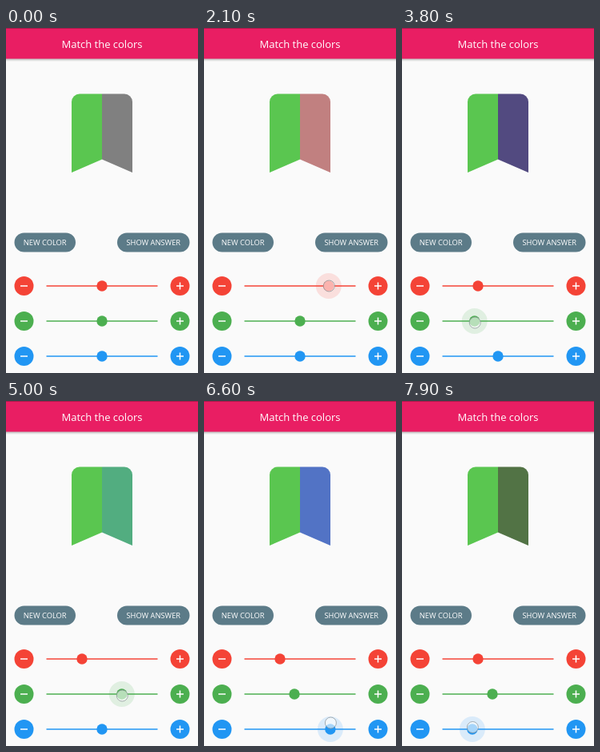
These frames come from a looping animation (240x432 px, 8000 ms). An HTML page:

```html
<!DOCTYPE html>
<html lang="en">
<head>
<meta charset="utf-8">
<title>Match the colors</title>
<style>
  html, body { margin: 0; height: 100%; overflow: hidden; background: #fafafa; }
  svg { display: block; width: 100vw; height: 100vh; }
  text { fill: #fff; font: 500 9.3px "Open Sans", "Noto Sans", sans-serif; text-anchor: middle; }
  .title { font-size: 13px; }
  .pill { fill: #5c7b88; }
  .icon { stroke: #fff; stroke-width: 1.5; }
</style>
</head>
<body>
<svg viewBox="0 0 240 432">
  <defs>
    <linearGradient id="shade" x2="0" y2="1">
      <stop stop-opacity=".28"/>
      <stop offset="1" stop-opacity="0"/>
    </linearGradient>
  </defs>
  <rect y="38" width="240" height="4" fill="url(#shade)"/>
  <rect width="240" height="38.5" fill="#e91e63"/>
  <rect width="240" height="1" fill="#b0184c"/>
  <text class="title" x="120" y="24.5">Match the colors</text>

  <path fill="#5ac650" d="M120 82.5H92a10 10 0 0 0-10 10V181l38-16.5z"/>
  <path id="guess" d="M120 82.5h28a10 10 0 0 1 10 10V181l-38-16.5z"/>

  <rect class="pill" x="10.5" y="256.5" width="76.5" height="24" rx="12"/>
  <text x="48.7" y="271.8">NEW COLOR</text>
  <rect class="pill" x="139" y="256.5" width="90.5" height="24" rx="12"/>
  <text x="184.3" y="271.8">SHOW ANSWER</text>

  <g id="sliders"></g>
  <circle id="touch" r="7" fill="#fff" fill-opacity=".6" stroke="#8c9499" stroke-opacity=".75"/>
</svg>
<script>
const LOOP = 8000, LEFT = 50.5, WIDTH = 139;
const $ = id => document.getElementById(id);
const smooth = p => p * p * (3 - 2 * p);
const accelerate = p => p * p;

// Keys are [time, thumb x, easing towards this key]; lift is the finger's offset from the thumb.
const sliders = [
  { y: 323, color: '#f44336', press: [900, 2700], lift: [[0, 0]],
    keys: [[900, 120], [1700, 171], [1900, 171], [2600, 95]] },
  { y: 367, color: '#4caf50', press: [3200, 5600], lift: [[3200, 0], [3800, 2]],
    keys: [[3200, 120], [3900, 89], [4300, 89], [5150, 171, accelerate], [5500, 113]] },
  { y: 411, color: '#2196f3', press: [6200, LOOP], lift: [[6200, 0], [6600, -8], [7000, -8], [7900, -2.5]],
    keys: [[6200, 120], [6800, 171], [7000, 171], [8100, 80]] }
];

function sample(keys, t) {
  const next = keys.findIndex(key => key[0] > t);
  if (next === 0) return keys[0][1];
  if (next < 0) return keys[keys.length - 1][1];
  const [t0, x0] = keys[next - 1], [t1, x1, ease = smooth] = keys[next];
  return x0 + (x1 - x0) * ease((t - t0) / (t1 - t0));
}

$('sliders').innerHTML = sliders.map(({ y, color }) => `
  <g transform="translate(0 ${y})" fill="${color}">
    <circle cx="22.5" r="12"/><path class="icon" d="M18 0h9"/>
    <circle cx="217.5" r="12"/><path class="icon" d="M213 0h9M217.5-4.5v9"/>
    <path d="M${LEFT} 0h${WIDTH}" stroke="${color}" stroke-width="1.6"/>
    <circle class="halo" fill-opacity=".15"/>
    <circle class="thumb" r="6.7"/>
  </g>`).join('');

const halos = document.querySelectorAll('.halo');
const thumbs = document.querySelectorAll('.thumb');

function draw(now) {
  const t = now % LOOP;
  let touching = false;
  const channels = sliders.map(({ y, keys, press: [down, up], lift }, i) => {
    const x = sample(keys, t);
    const pressed = t >= down && t < up;
    thumbs[i].setAttribute('cx', x);
    halos[i].setAttribute('cx', x);
    halos[i].setAttribute('r', pressed ? 16 * Math.min(1, .5 + (t - down) / 200) : 0);
    if (pressed) {
      touching = true;
      $('touch').setAttribute('cx', x + .5);
      $('touch').setAttribute('cy', y + sample(lift, t));
    }
    return Math.round((x - LEFT) / WIDTH * 255);
  });
  $('touch').setAttribute('visibility', touching ? 'visible' : 'hidden');
  $('guess').setAttribute('fill', `rgb(${channels})`);
  requestAnimationFrame(draw);
}
const start = performance.now();
(function tick() { draw(0); })();
draw = (frame => frame)(draw);
</script>
</body>
</html>
```
